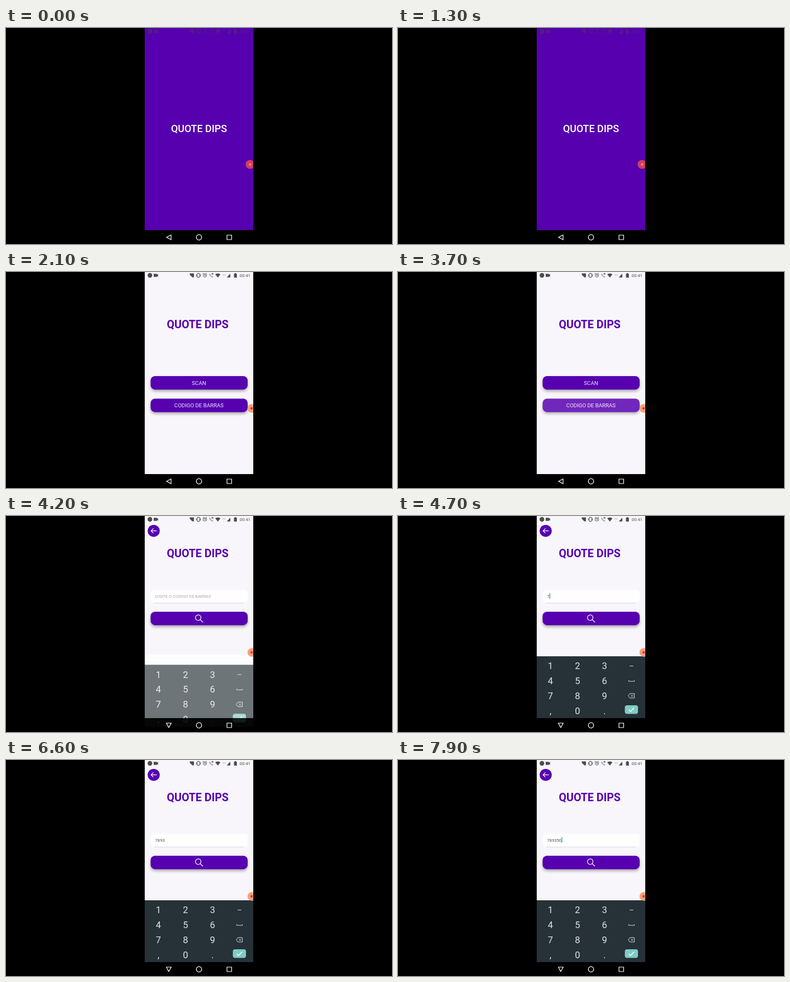
Write an HTML page that moves like this. It is 690 px wide and 388 px high and loops after 8000 ms.

```html
<!DOCTYPE html>
<html lang="pt">
<head>
<meta charset="utf-8">
<style>
html, body { margin: 0; width: 100%; height: 100%; overflow: hidden; background: #000; }
svg { display: block; width: 690px; height: 388px; font-family: Roboto, sans-serif; }
text { text-anchor: middle; }
.start { text-anchor: start; }
.title { font-weight: 700; font-size: 19.6px; fill: #5700b0; }
.label { font-size: 9.7px; fill: #f3eafa; }
.btn { fill: #5700b0; filter: drop-shadow(0 3px 2.5px rgba(0, 0, 0, .32)); }
.line { fill: none; stroke: #fff; stroke-width: 1.2; }
#keys text { font-size: 16.5px; fill: #dfe4e6; }
#keys .line { stroke: #cfd6d9; stroke-width: 1; }
#status { fill: #444; }
#status .line { stroke: #444; stroke-width: 1; }
#status text { font-size: 7.8px; }
</style>
</head>
<body>
<svg viewBox="0 0 690 388">
  <defs>
    <clipPath id="phone"><path d="M248 0H442V388H248Z"/></clipPath>
    <clipPath id="view"><path d="M248 0H442V363H248Z"/></clipPath>
  </defs>
  <g clip-path="url(#view)">
    <g id="splash">
      <path fill="#5700b0" d="M248 0H442V363H248Z"/>
      <text x="345" y="187" font-size="17.9" font-weight="500" fill="#fff">QUOTE DIPS</text>
    </g>

    <g id="home">
      <path fill="#f8f6fa" d="M248 0H442V410H248Z"/>
      <text class="title" x="342.7" y="101">QUOTE DIPS</text>
      <rect class="btn" x="258.5" y="187" width="173.5" height="24.2" rx="8"/>
      <text class="label" x="345" y="202.7">SCAN</text>
      <g id="codeBtn">
        <rect class="btn" x="258.5" y="227.5" width="173.5" height="24.2" rx="8"/>
        <text class="label" x="345" y="243.2">CODIGO DE BARRAS</text>
      </g>
    </g>

    <g id="search">
      <path fill="#f8f6fa" d="M248 0H442V410H248Z"/>
      <path id="gap" fill="#fefdfe" d="M248 249H442V363H248Z"/>
      <circle cx="264" cy="26.7" r="10.8" fill="#5700b0"/>
      <path class="line" stroke-width="1.6" d="M269.5 26.7H259.5M263.5 22.5L259.3 26.7L263.5 30.9"/>
      <text class="title" x="342.7" y="73.7">QUOTE DIPS</text>
      <rect x="258.5" y="132.5" width="173.5" height="23.5" rx="6" fill="#fefefe"/>
      <path fill="none" stroke="#d3d0d6" stroke-width=".8" d="M265 156.2H426"/>
      <text id="hint" class="start" x="266.5" y="146.8" font-size="7.5" fill="#a9a7ac">DIGITE O CODIGO DE BARRAS</text>
      <text id="code" class="start" x="266.5" y="146.8" font-size="7.7" fill="#555"></text>
      <rect id="caret" y="138.5" width="1.2" height="10.5" fill="#2a9d8f"/>
      <rect class="btn" x="258.5" y="172" width="173.5" height="24.2" rx="8"/>
      <circle class="line" cx="343.6" cy="182.6" r="4.9"/>
      <path class="line" d="M347.2 186.2L352 191"/>
    </g>

    <g id="status">
      <circle cx="257.3" cy="6" r="4.2"/>
      <path d="M264 3.2H270V5L272 3.6V8.4L270 7V8.8H264Z"/>
      <path d="M328.5 2.5H336V9.5H333L328.5 5Z"/>
      <path class="line" d="M342 2.5H346V9.5H342ZM340.4 4V8M347.6 4V8"/>
      <circle class="line" cx="355.5" cy="6.2" r="3"/>
      <path class="line" d="M355.5 4.2V6.5H357M351.8 3.6L353.6 2M357.4 2L359.2 3.6"/>
      <path class="line" stroke-width="1.6" d="M364 3Q364.5 8.5 370 9M367 5.5L370 2.5M367.5 2.5H370V5"/>
      <path d="M374 4.2Q378.7 .6 383.4 4.2L378.7 10Z"/>
      <text x="390" y="7" style="font-size:5.5px" opacity=".35">4G</text>
      <path d="M394.5 9.7L401 3V9.7Z"/>
      <path d="M407.5 3H409V2H411.2V3H412.7V10H407.5Z"/>
      <text x="427.3" y="8.8">00:41</text>
    </g>
  </g>

  <g clip-path="url(#phone)">
    <g id="keys">
      <path fill="#263238" d="M248 252H442V363H248Z"/>
      <path class="line" d="M414 269.5H420.5M412.5 295V297H422.5V295"/>
      <path class="line" d="M411.5 323L414.5 319H422.5V327H414.5ZM416.5 321.2L420.2 324.9M420.2 321.2L416.5 324.9"/>
      <rect x="405.5" y="340" width="23.5" height="15.5" rx="4" fill="#80cbc4"/>
      <path class="line" style="stroke:#fff;stroke-width:1.4" d="M412.5 348L415.8 351.2L422 344.6"/>
    </g>
    <path id="bar" d="M248 363H442V388H248Z"/>
    <g class="line">
      <path id="back"/>
      <circle cx="345" cy="376" r="4.8"/>
      <path d="M395 372H403.3V380H395Z"/>
    </g>
    <circle id="dot" cy="245"/>
    <circle id="core" cy="245" r="2.2"/>
  </g>
</svg>
<script>
const LOOP = 8000, STEP = 100, BLINK = 450;
const CODE = '789350';
// Focus time, followed by the time of each digit
const PRESSES = [4450, 4700, 5000, 5250, 6150, 6950, 7900];
const $ = id => document.getElementById(id);
const set = (id, attrs) => {
  for (const k in attrs) $(id).setAttribute(k, attrs[k]);
};
const ramp = (t, from, to) => Math.min(1, Math.max(0, (t - from) / (to - from)));
const easeOut = p => 1 - (1 - p) ** 3;

['123', '456', '789', ',0.'].forEach((row, r) => [...row].forEach((ch, c) => {
  const key = document.createElementNS('http://www.w3.org/2000/svg', 'text');
  key.textContent = ch;
  key.setAttribute('x', 272.5 + c * 48.3);
  key.setAttribute('y', 275.2 + r * 26.8);
  $('keys').append(key);
}));

// New screens fade in while rising from below
function enter(id, p) {
  set(id, { opacity: p, transform: `translate(0 ${28 * (1 - easeOut(p))})` });
}

function draw(t) {
  const home = ramp(t, 1550, 2000);
  const search = ramp(t, 3750, 4050);
  const keys = ramp(t, 4000, 4300);
  enter('home', home);
  enter('search', search);
  set('codeBtn', { opacity: t >= 3700 ? .84 : 1 });
  set('status', { opacity: .5 + .45 * home });
  set('gap', { opacity: keys > 0 && keys < 1 ? 1 : 0 });
  set('keys', { opacity: keys, transform: `translate(0 ${46 * (1 - keys)})` });
  set('bar', { opacity: keys > 0 && keys < 1 ? .8 : 1 });
  set('back', { d: keys > 0 ? 'M286.7 372H295.3L291 380Z' : 'M287 376L295 371.7V380.3Z' });

  const count = PRESSES.filter(at => at <= t).length;
  const digits = Math.max(0, count - 1);
  const lit = count > 0 && (t - PRESSES[count - 1]) % (2 * BLINK) < BLINK;
  $('code').textContent = CODE.slice(0, digits);
  set('hint', { opacity: digits ? 0 : 1 });
  set('caret', { x: 266.5 + digits * 4.33, opacity: lit ? 1 : 0 });

  const light = home > .5;
  set('dot', { cx: light ? 439.5 : 436.3, r: light ? 7.8 : 8, fill: light ? '#f2a17e' : '#cf3f5c' });
  set('core', { cx: light ? 439 : 436.3, fill: light ? '#d2402e' : '#e58a96' });
}

function tick(now) {
  draw(Math.floor(now % LOOP / STEP) * STEP);
  requestAnimationFrame(tick);
}
draw(0);
requestAnimationFrame(tick);
</script>
</body>
</html>
```
